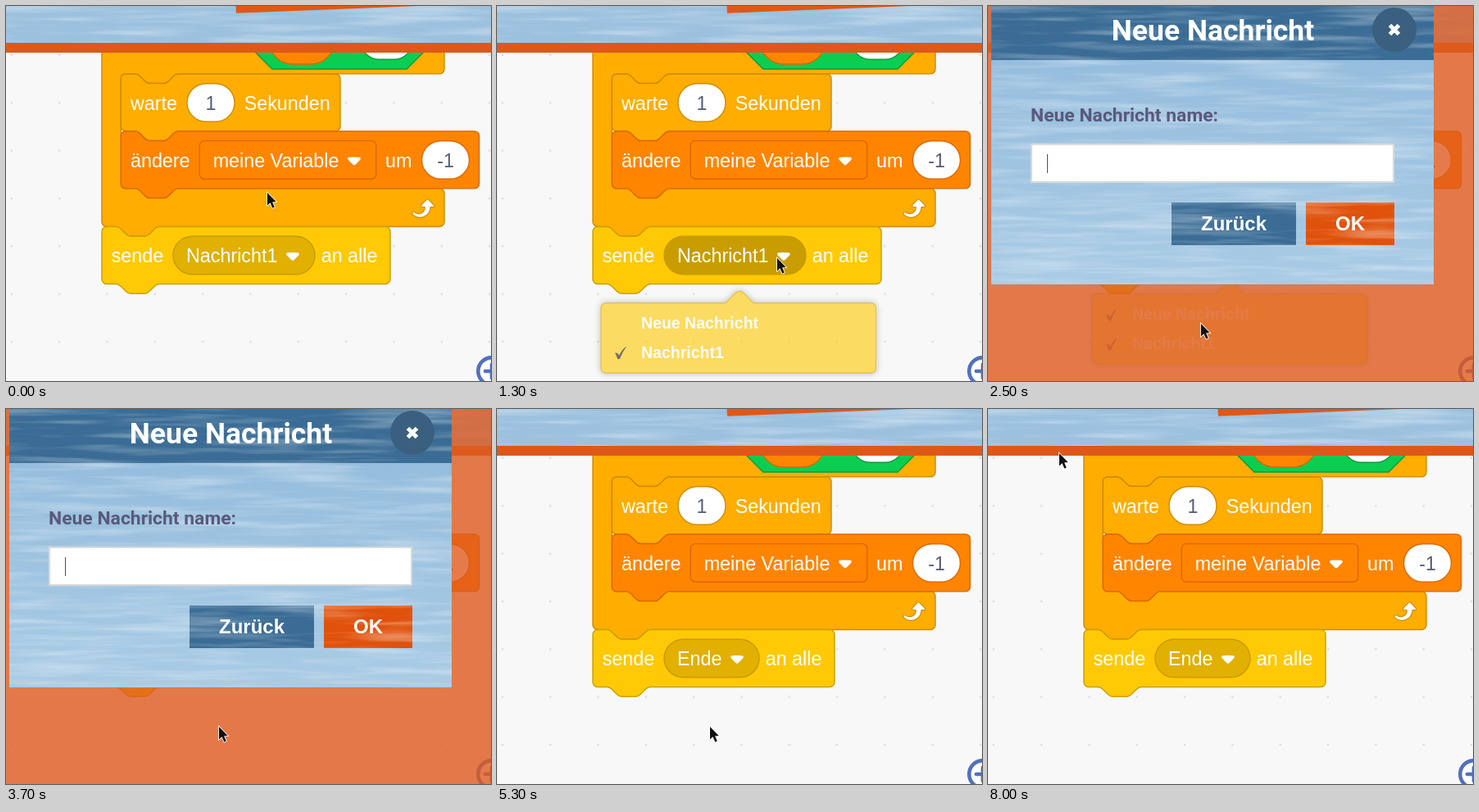
Write an HTML page that moves like this. It is 592 px wide and 458 px high and loops after 8100 ms.

```html
<!DOCTYPE html>
<html lang="de">
<head>
<meta charset="utf-8">
<title>Neue Nachricht</title>
<style>
  html, body { margin: 0; width: 100%; height: 100%; overflow: hidden; background: #f8f8f8; }
  svg { display: block; }
  text { font: 23.3px "Liberation Sans", Arial, sans-serif; fill: #fff; white-space: pre; }
  .num { fill: #575e75; text-anchor: middle; }
  .item { font-size: 19.5px; font-weight: 700; }
  .button { font-size: 24px; font-weight: 700; text-anchor: middle; }
  .ui { font-family: Roboto, sans-serif; font-weight: 700; fill: #59597b; }
  .control { fill: #ffad00; stroke: #cf8b00; }
  .data { fill: #ff8500; stroke: #db6800; }
  .event { fill: #ffc905; stroke: #cca000; }
</style>
</head>
<body>
<script>
const ZOOM = 1.458, LOOP = 8100, STEP = 100;

// Block outlines in unzoomed units
const notch = 'c2 0 3 1 4 2l4 4c1 1 2 2 4 2h12c2 0 3-1 4-2l4-4c1-1 2-2 4-2';
const tab = 'c-2 0-3 1-4 2l-4 4c-1 1-2 2-4 2h-12c-2 0-3-1-4-2l-4-4c-1-1-2-2-4-2';
const stack = w => `M0 4A4 4 0 0 1 4 0H12${notch}H${w - 4}a4 4 0 0 1 4 4v40a4 4 0 0 1-4 4H48${tab}H4a4 4 0 0 1-4-4z`;
const loopShape = `M0-160H286.7v28a4 4 0 0 1-4 4H64${tab}H20a4 4 0 0 0-4 4v88a4 4 0 0 0 4 4
  H282.7a4 4 0 0 1 4 4v24a4 4 0 0 1-4 4H48${tab}H4a4 4 0 0 1-4-4z`;
const arrowShape = `M6.36 7.79a1.43 1.43 0 0 1-1-.42L1.42 3.45a1.44 1.44 0 0 1 0-2c.56-.56 9.31-.56 9.87 0
  a1.44 1.44 0 0 1 0 2L7.37 7.37a1.43 1.43 0 0 1-1.01 .42z`;
const repeatShape = `M21.8 11h-2.6c0 1.5-.3 2.9-1 4.2c-.8 1.6-2.1 2.8-3.7 3.6c-1.5 .8-3.3 1.1-4.9 .8
  c-1.6-.2-3.2-1-4.4-2.1c-.4-.3-.4-.9-.1-1.2c.3-.4 .9-.4 1.2-.1c1 .7 2.2 1.1 3.4 1.1s2.3-.3 3.3-1
  c.9-.6 1.6-1.5 2-2.6c.3-.9 .4-1.8 .2-2.8h-2.4c-.4 0-.7-.3-.7-.7c0-.2 .1-.3 .2-.4l4.4-4.4
  c.3-.3 .7-.3 .9 0L22 9.8c.3 .3 .4 .6 .3 .9S22 11 21.8 11z`;

const zoomed = (d, x, y, attrs) =>
  `<path d="${d}" transform="translate(${x} ${y}) scale(${ZOOM})" ${attrs}/>`;
const text = (s, x, y, cls = '') => `<text x="${x}" y="${y}" class="${cls}">${s}</text>`;
const rect = (x, y, w, h, attrs) => `<rect x="${x}" y="${y}" width="${w}" height="${h}" ${attrs}/>`;
const arrow = (cx, y) => zoomed(arrowShape, cx - 9.3, y, 'fill="#fff"');
const number = (s, x, y, cls) =>
  rect(x, y - 23.3, 58, 46.6, `rx="23.3" class="${cls}" style="fill:#fff" stroke-width="1.4"`) +
  text(s, x + 29, y + 8.5, 'num');
const grained = (x, y, w, h, fill) =>
  rect(x, y, w, h, `fill="${fill}"`) + rect(x, y, w, h, 'filter="url(#grain)"');

const send = (id, name, pill) => `<g id="${id}">
  ${zoomed(stack((pill + 179) / ZOOM), 117, 269.5, 'class="event"')}
  ${rect(204, 281.2, pill, 46.6, 'rx="23.3" class="pill" fill="#e1b000" stroke="#c89b00" stroke-width="1.4"')}
  ${text('sende', 128.7, 313)}${text(name, 220, 313)}
  ${arrow(pill + 177, 299.5)}${text('an alle', pill + 211.7, 313)}</g>`;

const check = (y, id) => `<path ${id} d="M144 ${y}q3-1 5 3q4-8 9-11q-5 7-8 15q-2 1-3 0q-1-4-3-7z" fill="#111"/>`;

document.body.innerHTML = `<svg width="592" height="458">
<defs>
  <pattern id="dots" x="6.8" y="60" width="58.33" height="58.33" patternUnits="userSpaceOnUse"
    patternTransform="translate(-5 -5)"><circle cx="5" cy="5" r="1.4" fill="#ddd"/></pattern>
  <linearGradient id="sky" x2="0" y2="1"><stop stop-color="#95bddd"/><stop offset="1" stop-color="#a9cbe5"/></linearGradient>
  <filter id="grain" x="0" y="0" width="1" height="1" color-interpolation-filters="sRGB">
    <feTurbulence type="fractalNoise" baseFrequency=".007 .11" numOctaves="3" seed="4"/>
    <feColorMatrix values="0 0 0 0 1  0 0 0 0 1  0 0 0 0 1  .8 0 0 0 -.34"/>
  </filter>
  <filter id="shadow"><feDropShadow dx="0" dy="0" stdDeviation="4" flood-opacity=".4"/></filter>
</defs>
${rect(0, 0, 592, 458, 'fill="#f8f8f8"')}
${rect(0, 0, 592, 458, 'fill="url(#dots)"')}

${zoomed(loopShape, 117, 269.5, 'class="control"')}
<path d="M285 37L325 77H489L529 37z" fill="#0bce50" stroke="#0a9a40" stroke-width="1.4"/>
${rect(321, 13, 80, 58, 'rx="29" class="data" stroke-width="1.4"')}
${rect(432.6, 18.7, 64, 46.6, 'rx="23.3" fill="#fff" stroke="#0a9a40" stroke-width="1.4"')}
${zoomed(repeatShape, 489.5, 229, 'fill="#fff" stroke="#cf8b00" stroke-width="1.6" paint-order="stroke"')}

${zoomed(stack(183.6), 140.3, 82.9, 'class="control"')}
${text('warte', 152, 126.5)}${number('1', 221, 118, 'control')}${text('Sekunden', 290.7, 126.5)}

${zoomed(stack(299.9), 140.3, 152.9, 'class="data"')}
${text('ändere', 152, 196.5)}
${rect(236.3, 164.6, 215.5, 46.6, 'rx="5.8" class="data" stroke-width="1.4"')}
${text('meine Variable', 252.7, 196.5)}${arrow(425, 183)}
${text('um', 463, 196.5)}${number('-1', 507.5, 188, 'data')}

${send('before', 'Nachricht1', 173)}
${send('after', 'Ende', 116)}

<circle cx="593" cy="446" r="16.7" fill="#fff" stroke="#5470bb" stroke-width="4.6"/>
<path d="M585 446H601M593 438V454" stroke="#5470bb" stroke-width="4.6" stroke-linecap="round"/>

${grained(0, 0, 592, 45, '#9cc1df')}
<path d="M280.5 0H503L281 8.7z" fill="#de581a"/>
${rect(0, 45, 592, 12, 'fill="#de581a"')}

<g id="menu">
  <path d="M132 370H279L290.5 358Q296 353 301.5 358L313 370H457a5.5 5.5 0 0 1 5.5 5.5V450a5.5 5.5 0 0 1-5.5 5.5
    H132.500a5.500 5.500 0 0 1-5.500-5.500V375.500a5.500 5.500 0 0 1 5.500-5.500z" class="event" stroke-width="1.4" filter="url(#shadow)"/>
  ${rect(134, 377, 321, 36, 'id="hover" fill="#c99d00"')}
  ${check(395, 'id="check"')}${check(431, '')}
  ${text('Neue Nachricht', 176, 401, 'item')}${text('Nachricht1', 176, 437, 'item')}
</g>

<g id="dialog">
  ${rect(0, 0, 592, 458, 'fill="#df5a1e" opacity=".8"')}
  ${grained(4, 66, 540, 274, 'url(#sky)')}
  ${grained(4, 0, 540, 66, '#3a6c95')}
  <text x="274.5" y="42" class="ui" text-anchor="middle" style="font-size:35.5px;fill:#fff">Neue Nachricht</text>
  <circle cx="496" cy="29" r="27" fill="#3b5f7e"/>
  <path d="M490.500 23.500l11 11m0-11l-11 11" stroke="#fff" stroke-width="5"/>
  <text x="52" y="141" class="ui" style="font-size:22.9px">Neue Nachricht name:</text>
  ${rect(53, 169, 442, 46, 'fill="#fff" stroke="#d9d9d9" stroke-width="2"')}
  <text id="typed" x="71.500" y="198" class="ui" style="font-size:14.4px"></text>
  ${rect(72, 181, 1, 23, 'id="caret" fill="#4c4c68"')}
  ${grained(224, 240, 152, 52, '#3a6c95')}${text('Zurück', 300, 274, 'button')}
  ${grained(388, 240, 108, 52, '#e0520c')}${text('OK', 442, 274, 'button')}
</g>

<path id="cursor" d="M0 0V15.500L3.500 12.300L6.300 18.700L8.800 17.600L6.100 11.400L10.700 11z"
  fill="#111" stroke="#fff" stroke-width="1.600" paint-order="stroke"/>
</svg>`;

// Pointer stops: time, x, y
const stops = [
  [0, 319, 228], [100, 314, 228],
  [500, 311, 230], [600, 314, 246], [700, 324, 276], [800, 338, 303], [900, 343, 310],
  [1100, 342, 308], [1500, 340, 312], [1600, 331, 331], [1700, 312, 356], [1800, 290, 374],
  [1900, 272, 381], [2000, 260, 388], [6100, 263, 388],
  [6700, 265, 384], [6800, 217, 300], [6900, 122, 112], [7000, 89, 53], [7300, 86, 53], [8000, 87, 54]
];
const keys = [3800, 4200, 4300, 4500];
const el = id => document.getElementById(id);
const show = (id, on) => { el(id).style.display = on ? '' : 'none'; };
const clamp = v => Math.max(0, Math.min(1, v));

function draw(t) {
  const [, x, y] = stops.findLast(s => s[0] <= t);
  el('cursor').setAttribute('transform', `translate(${x} ${y})`);

  const done = t >= 5300, modal = t >= 2500 && !done;
  show('before', !done);
  show('after', done);
  show('dialog', modal);

  const open = modal ? clamp((2700 - t) / 400) : clamp((t - 1150) / 250);
  show('menu', !done && open > 0);
  el('menu').style.opacity = open;
  el('menu').setAttribute('transform', `translate(0 ${modal ? -18 : -18 * (1 - open)})`);
  show('hover', !modal && t >= 1900);
  show('check', modal);
  document.querySelector('#before .pill').setAttribute('fill', t >= 1200 ? '#c99d00' : '#e1b000');

  const typed = keys.filter(k => k <= t).length;
  el('typed').textContent = 'Ende'.slice(0, typed);
  el('caret').setAttribute('x', 72 + 8 * typed);
  show('caret', t < 3100 || (t >= 3700 && t < 5100));
}

let start;
function tick(now) {
  start ??= now;
  draw(Math.floor((now - start) % LOOP / STEP) * STEP);
  requestAnimationFrame(tick);
}
draw(0);
requestAnimationFrame(tick);
</script>
</body>
</html>
```
